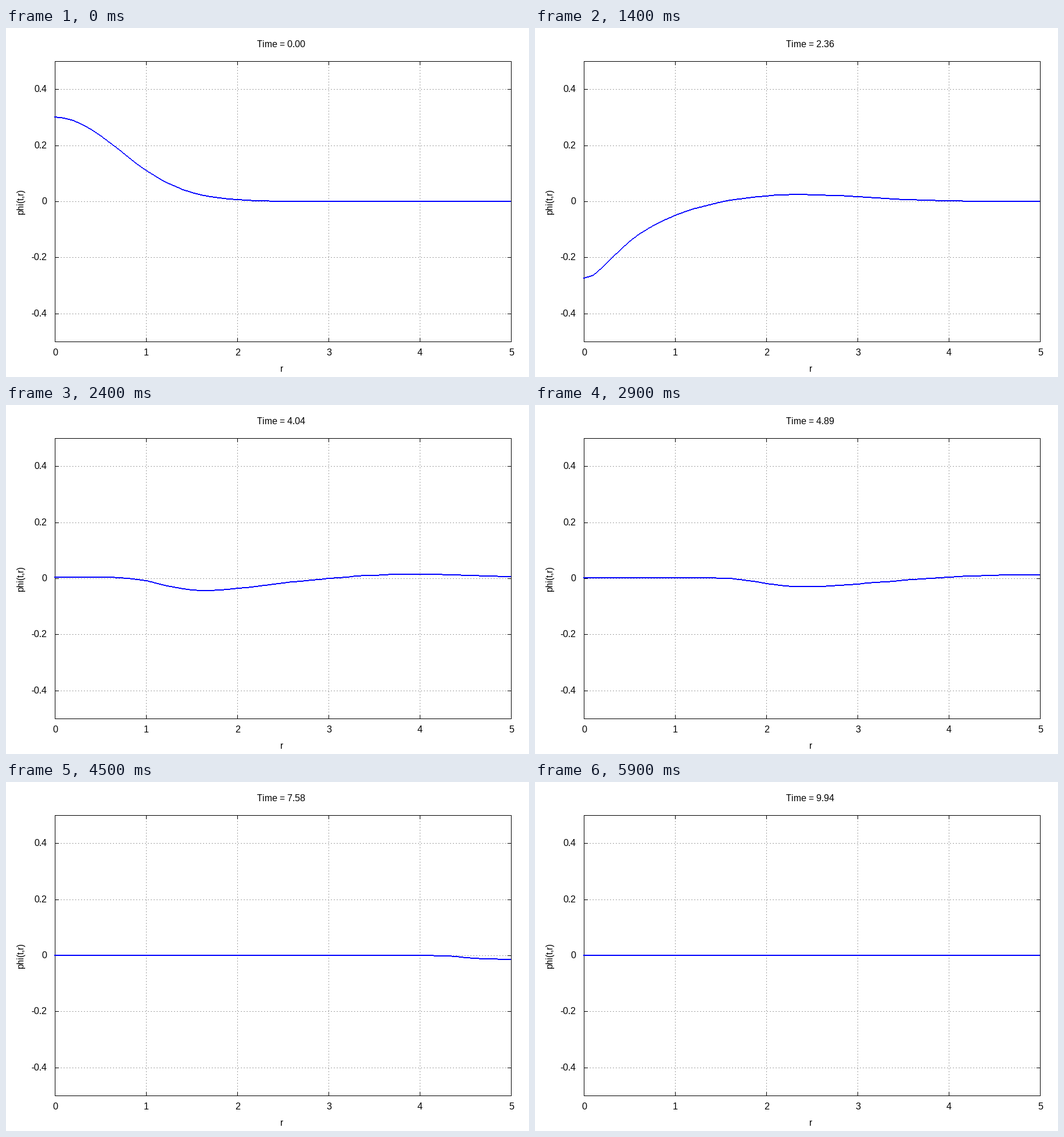
A matplotlib script for the animation above (6000 ms loop, 900x600 px).

```python
import numpy as np
import matplotlib.pyplot as plt
from matplotlib.animation import FuncAnimation

plt.rcParams["font.family"] = "Liberation Sans"
plt.rcParams["text.hinting"] = "default"
plt.rcParams["text.hinting_factor"] = 1      # whole-pixel letter spacing

W, H, DPI = 900, 600, 100
PX = 72 / DPI                      # one pixel in points
LEFT, RIGHT, TOP, BOTTOM = 84, 869, 57, 539
FRAMES, INTERVAL = 60, 100
STEP = 0.1685                      # coordinate time per frame
SUBSTEPS = 30

# Self-gravitating scalar field in polar-areal coordinates
DR, R_MAX = 0.01, 10.0
N = int(round(R_MAX / DR))
face = np.arange(N + 1) * DR
r = face[:-1] + DR / 2
volume = np.diff(face**3) / 3


def rates(state):
    phi, mom = state
    grad = np.zeros(N + 1)
    grad[1:-1] = np.diff(phi) / DR
    slope = (grad[1:] + grad[:-1]) / 2
    source = 4 * np.pi * r * (slope**2 + mom**2) * DR
    growth = np.exp(np.cumsum(source) - source / 2)   # lapse times radial metric
    speed = np.empty(N + 1)                           # lapse over radial metric
    speed[1:] = np.cumsum(growth) * DR / face[1:]
    speed[0] = growth[0]
    speed /= speed[-1]                                # light speed 1 at the edge
    flux = face**2 * speed * grad
    return np.array([(speed[1:] + speed[:-1]) / 2 * mom, np.diff(flux) / volume])


def advance(state, dt):
    k1 = rates(state)
    k2 = rates(state + dt / 2 * k1)
    k3 = rates(state + dt / 2 * k2)
    k4 = rates(state + dt * k3)
    return state + dt / 6 * (k1 + 2 * k2 + 2 * k3 + k4)


def to_x(radius):
    return np.rint(LEFT + (RIGHT - LEFT) * radius / 5)


def to_y(value):
    return np.rint((TOP + BOTTOM) / 2 - (BOTTOM - TOP) * value)


def evolve(samples, columns):
    """Pixel row of the curve in every column, for each frame."""
    state = np.array([0.3 * np.exp(-r**2), np.zeros(N)])
    radii = np.append(0, r)
    rows = []
    for _ in range(FRAMES):
        phi = state[0]
        center = (9 * phi[0] - phi[1]) / 8
        points = to_y(np.interp(samples, radii, np.append(center, phi)))
        rows.append(np.rint(np.interp(columns, to_x(samples), points)))
        for _ in range(SUBSTEPS):
            state = advance(state, STEP / SUBSTEPS)
    return rows


columns = np.arange(LEFT - 1, RIGHT)
rows = evolve(np.linspace(0, 5, 51), columns)

fig = plt.figure(figsize=(W / DPI, H / DPI), dpi=DPI, facecolor="white")
ax = fig.add_axes([0, 0, 1, 1])
ax.set_xlim(0, W)
ax.set_ylim(H, 0)
ax.axis("off")


def rule(x0, y0, x1, y1, color="black", **style):
    """One-pixel line through pixel centres, end pixels included."""
    dx, dy = (0.5, 0) if y0 == y1 else (0, 0.5)
    ax.plot([x0 + 0.5 - dx, x1 + 0.5 + dx], [y0 + 0.5 - dy, y1 + 0.5 + dy],
            color=color, lw=PX, snap=False, solid_capstyle="butt", **style)


def label(x, y, text, ha="center", **style):
    return ax.text(x, y, text, ha=ha, va="baseline", fontsize=16 * PX,
                   color="black", **style)


dotted = dict(color="#a0a0a0", ls=(0, (2, 3)), dash_capstyle="butt", zorder=1)
TICK = 6

for n in range(6):
    x = to_x(n)
    label(x + 0.5, 563, str(n))
    if 0 < n < 5:
        rule(x, TOP, x, BOTTOM, **dotted)
        rule(x, BOTTOM - TICK, x, BOTTOM, zorder=3)
        rule(x, TOP, x, TOP + TICK, zorder=3)

for n in range(-2, 3):
    y = to_y(n / 5)
    label(70, y + 5, f"{n / 5:g}", ha="right")
    rule(LEFT, y, RIGHT, y, **dotted)
    rule(LEFT, y, LEFT + TICK, y, zorder=3)
    rule(RIGHT - TICK, y, RIGHT, y, zorder=3)

for x in (LEFT, RIGHT):
    rule(x, TOP, x, BOTTOM, zorder=3)
for y in (TOP, BOTTOM):
    rule(LEFT, y, RIGHT, y, zorder=3)

label(474.5, 591, "r")
label(30, 298.5, "phi(t,r)", rotation=90, rotation_mode="anchor")
title = label(432, 33, "", ha="left")

# Two-pixel stroke built from pixel columns
curve = ax.stairs(rows[0] + 1, np.append(columns, RIGHT), baseline=rows[0] - 1,
                  fill=True, color="#0000ff", lw=0, antialiased=False,
                  snap=False, zorder=4)


def draw(i):
    curve.set_data(values=rows[i] + 1, baseline=rows[i] - 1)
    title.set_text(f"Time = {i * STEP:.2f}")
    return curve, title


anim = FuncAnimation(fig, draw, frames=FRAMES, interval=INTERVAL, repeat=True,
                     repeat_delay=0, blit=False)
plt.show()
```
